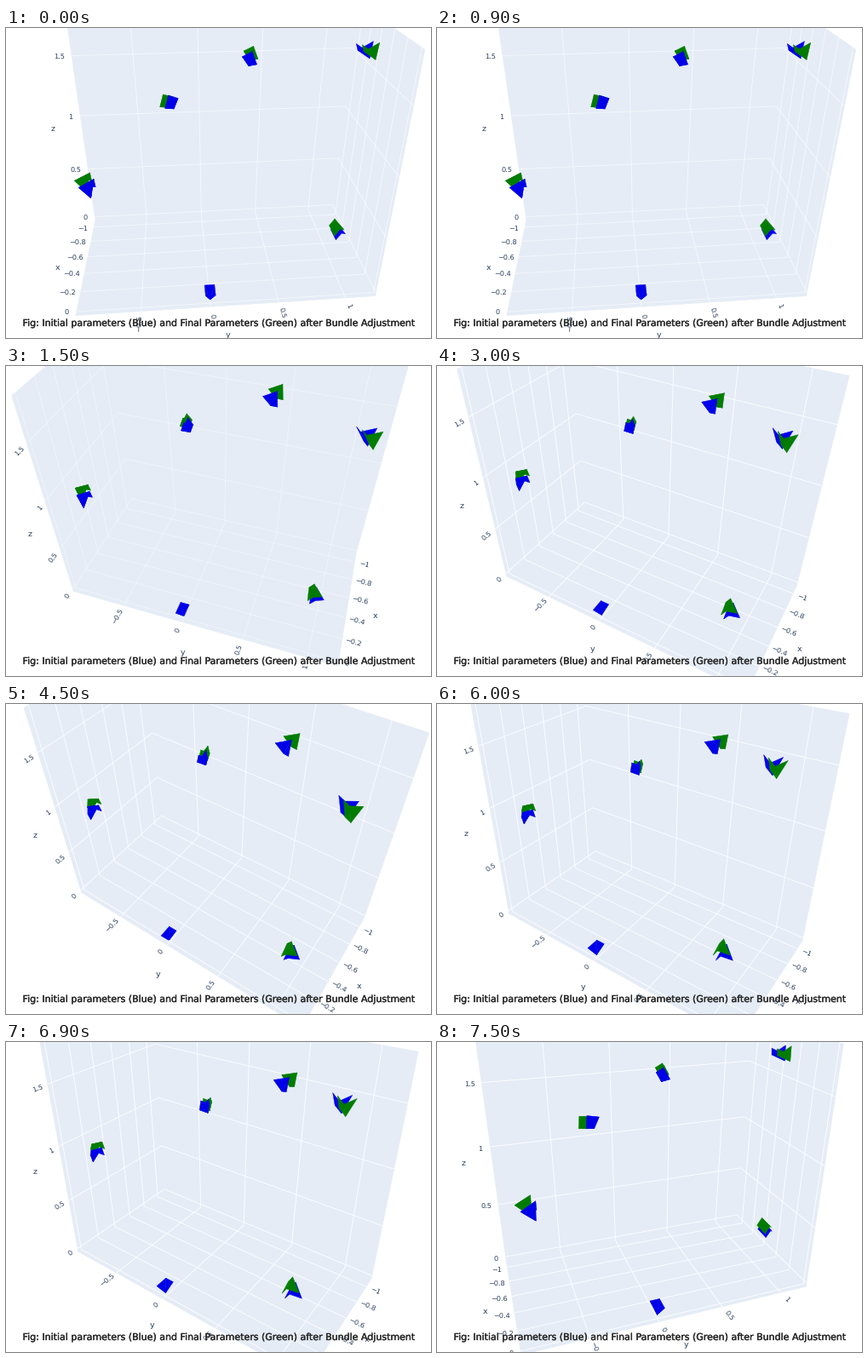
Write a matplotlib script that moves like this. It is 499 by 364 pixels and loops after 9 s.

```python
import numpy as np
import matplotlib.pyplot as plt
from matplotlib import patheffects
from matplotlib.animation import FuncAnimation
from matplotlib.collections import LineCollection, PolyCollection
from matplotlib.patches import Polygon
from matplotlib.tri import Triangulation

W, HGT, DPI = 499, 364, 100
PX = 72 / DPI
INK, WALL, TEXT = "#2a3f5f", "#e5ecf6", "#2b2b2b"
BLUE, GREEN = "#0000e8", "#007c00"
CAPTION = ("Fig: Initial parameters (Blue) and Final Parameters (Green) "
           "after Bundle Adjustment")
TICKS = [(-1, -.8, -.6, -.4, -.2, 0), (-.5, 0, .5, 1), (0, .5, 1, 1.5)]

# L and H stand for the low and high end of an axis
L, H = -9, 9
MID = np.array([-.5, .1, .9])
TARGET = np.array([0, 0, .9])

# Box points whose screen places fix each view
FRONT = [(L, L, L), (L, L, 1.5), (L, H, 1.5),
         (H, 0, L), (H, 1, L), (H, H, L), (H, L, L)]
CORNER = [(H, L, L), (H, L, 1.5), (H, .5, L), (L, H, L), (-.6, H, L),
          (L, H, H), (H, L, H)]

# Kind of view, strength of the grid lines, screen places of its key points
VIEWS = [
    (True, .6, [(105, 226), (77, 33), (409, 24),
                (240, 327), (400, 316), (430, 314), (81, 338)]),
    (False, .4, [(81, 265), (25, 91), (277, 322), (411, 218), (402, 273),
                 (np.nan, np.nan), (6, 34)]),
    (False, .85, [(83, 247), (37, 60), (255, 330), (422, 258), (401, 307),
                  (484, 11), (23, 4)]),
    (False, .8, [(89, 220), (37, 56), (249, 321), (422, 250), (392, 304),
                 (495, 34), (21, 5)]),
    (False, .85, [(86, 246), (48, 50), (245, 335), (428, 278), (401, 325),
                  (484, 11)]),
    (True, .85, [(80, 256), (53, 47), (367, 22),
                 (262, 329), (403, 294), (432, 288)]),
]

# The five moving pyramids as seen in two of the views
SEEN = {
    BLUE: {0: [(91, 185), (192, 83), (287, 32), (425, 21), (391, 238)],
           3: [(101, 127), (233, 61), (330, 49), (405, 118), (339, 299)]},
    GREEN: {0: [(86, 177), (186, 82), (288, 25), (431, 21), (390, 234)],
            3: [(101, 119), (235, 55), (340, 42), (411, 126), (336, 294)]},
}

# Shared by all views: focal length and centre row (hundreds of px), axis ends
SHARED = [6, 1.82, -1.08, -.96, -.055, .06, 1.19, 1.88]
NS = len(SHARED)


def pose(p, i):
    yaw, pitch, *shift = p[NS + 5 * i:NS + 5 * i + 5]
    s, c, se, ce = np.sin(yaw), np.cos(yaw), np.sin(pitch), np.cos(pitch)
    rot = np.array([[s, c, 0], [c * se, -s * se, -ce], [-c * ce, s * ce, -se]])
    return rot, np.array(shift)


def project(p, i, pts):
    pts = np.asarray(pts, float)
    w = np.where(pts == L, p[2:5], np.where(pts == H, p[5:8], pts))
    rot, shift = pose(p, i)
    q = (w - MID) @ rot.T + shift
    return [W / 2, 100 * p[1]] + 100 * p[0] * q[:, :2] / q[:, 2:]


def residual(p):
    parts = []
    for i, (front, _, spots) in enumerate(VIEWS):
        keys = (FRONT if front else CORNER)[:len(spots)]
        parts.append((project(p, i, keys) - spots).ravel())
    r = np.nan_to_num(np.concatenate(parts))
    a, k = np.abs(r), 2.0
    far = np.sign(r) * np.sqrt(np.maximum(2 * k * a - k * k, 0))
    return np.append(np.where(a <= k, r, far), 5 * (p[:NS] - SHARED))


def solve():
    """Damped least squares for all views at once."""
    start = [(np.radians(12 if front else -28), np.radians(36), 0, -.2, 4)
             for front, *_ in VIEWS]
    p = np.append(SHARED, start)
    r, lam, step = residual(p), 1e-2, 1e-5
    for _ in range(150):
        jac = np.array([(residual(p + step * e) - r) / step
                        for e in np.eye(len(p))]).T
        a = jac.T @ jac
        move = np.linalg.solve(a + np.diag(lam * np.diag(a) + 1e-8), -jac.T @ r)
        new = residual(p + move)
        if new @ new < r @ r:
            p, r, lam = p + move, new, max(lam / 3, 1e-7)
        else:
            lam = min(lam * 4, 1e6)
    return p


def locate(p, seen, k):
    """Space point that projects to the k-th place seen in each view."""
    rows, rhs = [], []
    for i, spots in seen.items():
        rot, shift = pose(p, i)
        ray = (np.array(spots[k]) - [W / 2, 100 * p[1]]) / (100 * p[0])
        for axis in (0, 1):
            rows.append(rot[axis] - ray[axis] * rot[2])
            rhs.append(ray[axis] * shift[2] - shift[axis])
    return np.linalg.lstsq(np.array(rows), np.array(rhs), rcond=None)[0] + MID


def pyramid(center, depth=.093, wide=.053, high=.036):
    """Triangles of a pyramid that opens towards the target."""
    d = (TARGET - center) / np.linalg.norm(TARGET - center)
    # shortest turn from the z axis to d
    v = np.array([-d[1], d[0], 0])
    k = np.array([[0, 0, v[1]], [0, 0, -v[0]], [-v[1], v[0], 0]])
    turn = np.eye(3) + k + k @ k / (1 + d[2])
    pts = np.array([(0, 0, -depth / 2)] +
                   [(sx * wide, sy * high, depth / 2)
                    for sx in (-1, 1) for sy in (-1, 1)]) @ turn.T + center
    # the surface is meshed over the x-y plane, so some sides stay open
    return pts[Triangulation(pts[:, 0], pts[:, 1]).triangles]


cams = solve()
solids = [(BLUE, pyramid(np.array([0, 0, .046])))]
solids += [(color, pyramid(locate(cams, seen, k)))
           for color, seen in SEEN.items() for k in range(5)]

plt.rcParams["font.family"] = "DejaVu Sans"
plt.rcParams["text.hinting"] = "none"
fig = plt.figure(figsize=(W / DPI, HGT / DPI), dpi=DPI, facecolor="white")
ax = fig.add_axes([0, 0, 1, 1])


def at(edge, value):
    return [value if e is None else e for e in edge]


def axis_edges(front):
    """For x, y and z: the labelled edge and the far end of its grid lines."""
    near, far = (L, H) if front else (H, L)
    return [((None, near, L), (None, far, L)),
            ((H, None, L), (L, None, L)),
            ((near if not front else L, L, None),
             (L, H if front else L, None))]


def grid(side):
    for x in TICKS[0]:
        yield (x, L, L), (x, H, L)
        yield (x, side, L), (x, side, H)
    for y in TICKS[1]:
        yield (L, y, L), (H, y, L)
        yield (L, y, L), (L, y, H)
    for z in TICKS[2]:
        yield (L, L, z), (L, H, z)
        yield (L, side, z), (H, side, z)


def label(i, ends, text, dist, size, level):
    """Text beyond the end of a grid line, turned along it unless level."""
    a, b = project(cams, i, ends)
    d = (a - b) / np.hypot(*(a - b))
    x, y = a + d * dist
    angle = (np.degrees(np.arctan2(-d[1], d[0])) + 90) % 180 - 90
    ax.text(x, y + 1, text, size=size * PX, color=INK, ha="center",
            va="center", rotation=0 if level else angle,
            rotation_mode="anchor", clip_on=True, zorder=6)


def draw(i):
    front, strength, _ = VIEWS[i]
    ax.cla()
    ax.set(xlim=(0, W), ylim=(HGT, 0))
    ax.axis("off")
    side = H if front else L

    for face in ([(L, L, L), (H, L, L), (H, H, L), (L, H, L)],
                 [(L, L, L), (L, H, L), (L, H, H), (L, L, H)],
                 [(L, side, L), (H, side, L), (H, side, H), (L, side, H)]):
        ax.add_patch(Polygon(project(cams, i, face), fc=WALL, ec=WALL,
                             lw=.4, zorder=1))
    ax.add_collection(LineCollection([project(cams, i, g) for g in grid(side)],
                                     colors="white", linewidths=PX,
                                     alpha=strength, zorder=2), autolim=False)

    for axis, (near, far) in enumerate(axis_edges(front)):
        flat = front and axis != 1
        for v in TICKS[axis]:
            text = f"{v:g}".replace("-", "\u2212")
            dist = (10.5 if flat else 8.5) + 1.2 * len(text)
            label(i, [at(near, v), at(far, v)], text, dist, 8.2, flat)
        mid = MID[axis]
        label(i, [at(near, mid), at(far, mid)], "xyz"[axis], 34, 9.5, True)

    rot, _ = pose(cams, i)
    for color, tris in sorted(solids, key=lambda s: -(s[1].mean((0, 1)) @ rot[2])):
        flat = project(cams, i, tris.reshape(-1, 3)).reshape(-1, 3, 2)
        ax.add_collection(PolyCollection(flat, facecolors=color, edgecolors=color,
                                         linewidths=.3, zorder=4), autolim=False)

    ax.text(W / 2, 350, CAPTION, size=11.02 * PX, color=TEXT,
            ha="center", va="baseline", zorder=8,
            path_effects=[patheffects.withStroke(linewidth=.4 * PX,
                                                 foreground=TEXT)])
    return []


anim = FuncAnimation(fig, draw, frames=len(VIEWS), interval=1500,
                     init_func=lambda: draw(0), repeat=True, repeat_delay=0)
plt.show()
```
